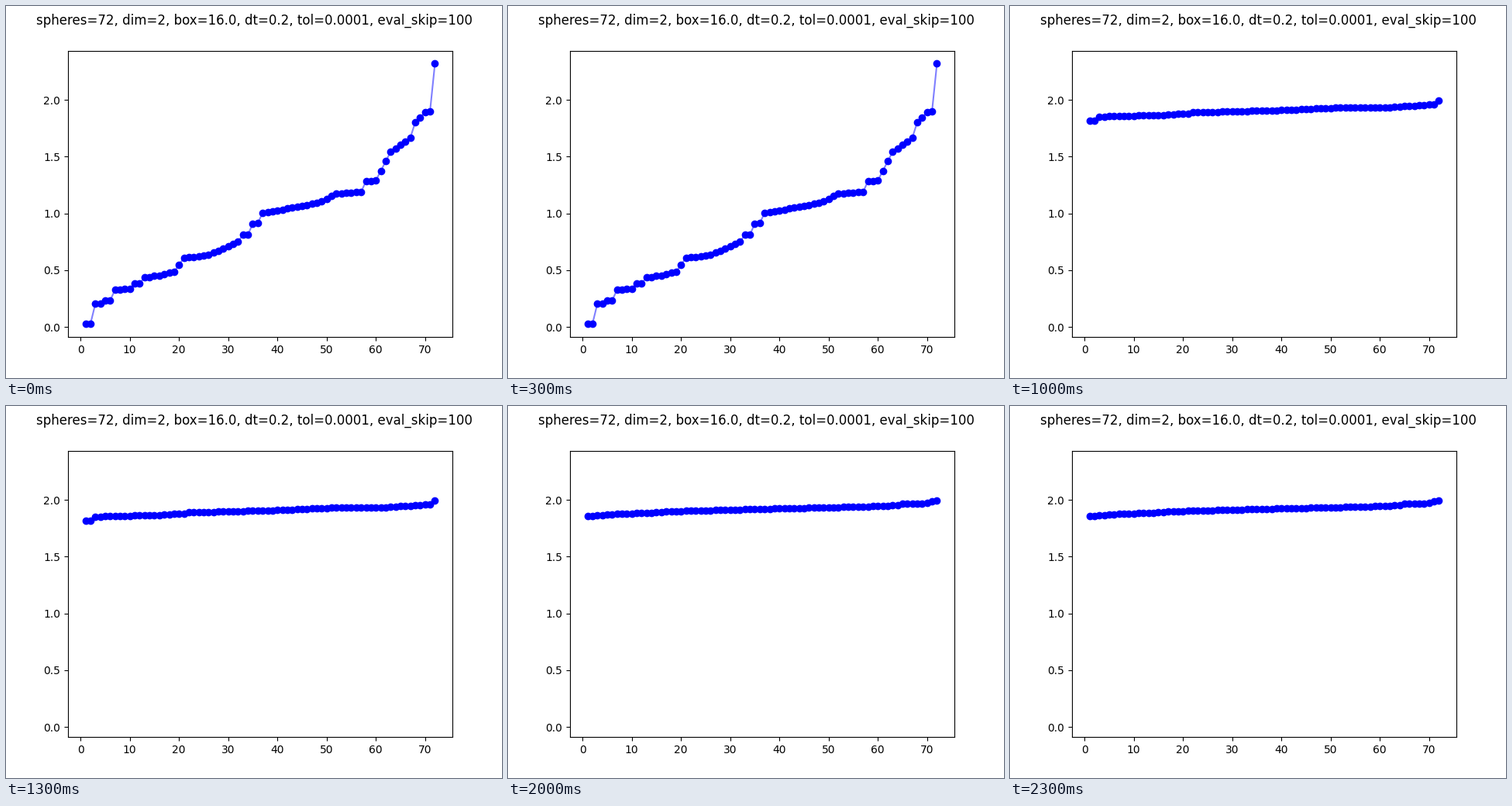
Recreate the animation shown at these times as a matplotlib script. Size 640 by 480 pixels, loop 2500 ms.

```python
import numpy as np
import matplotlib.pyplot as plt
from matplotlib.animation import FuncAnimation

COUNT = 72
PAIRED = 16  # closest spheres are mutual neighbours and share one distance

ranks = np.arange(1, COUNT + 1)


def curve(*knots):
    """Sorted distances through a few (rank, distance) knots."""
    at = np.where(ranks <= PAIRED, ranks - (ranks + 1) % 2, ranks)
    return np.interp(at, *zip(*knots))


curves = [
    # random start, with a jump between each group of spheres
    curve((1, 0.026), (3, 0.203), (5, 0.233), (7, 0.327), (9, 0.334),
          (13, 0.436), (19, 0.485), (21, 0.609), (26, 0.634), (32, 0.752),
          (33, 0.813), (34, 0.813), (35, 0.910), (36, 0.916), (37, 1.004),
          (45, 1.066), (49, 1.107), (52, 1.175), (57, 1.190), (58, 1.285),
          (60, 1.291), (63, 1.543), (67, 1.667), (68, 1.803), (70, 1.892),
          (71, 1.899), (72, 2.3195)),
    # spread out, then slowly evening out
    curve((1, 1.797), (13, 1.843), (21, 1.852), (22, 1.864), (28, 1.867),
          (41, 1.897), (61, 1.917), (70, 1.940), (71, 1.960), (72, 1.967)),
    curve((1, 1.817), (3, 1.853), (15, 1.867), (21, 1.880), (22, 1.890),
          (39, 1.908), (51, 1.931), (62, 1.936), (71, 1.960), (72, 1.9945)),
    curve((1, 1.8444), (3, 1.857), (12, 1.883), (18, 1.888), (33, 1.914),
          (35, 1.925), (48, 1.928), (62, 1.946), (71, 1.974), (72, 1.9945)),
    curve((1, 1.858), (7, 1.878), (14, 1.888), (16, 1.897), (31, 1.915),
          (58, 1.942), (64, 1.954), (65, 1.965), (69, 1.968), (72, 1.9945)),
]

fig, ax = plt.subplots(figsize=(6.4, 4.8), dpi=100)
fig.suptitle("spheres=72, dim=2, box=16.0, dt=0.2, tol=0.0001, eval_skip=100")
line, = ax.plot(ranks, curves[0], "b-", alpha=0.5)
dots, = ax.plot(ranks, curves[0], "bo")

# Keep the limits of the first, widest curve.
ax.set_xlim(ax.get_xlim())
ax.set_ylim(ax.get_ylim())


def update(i):
    for artist in (line, dots):
        artist.set_ydata(curves[i])
    return line, dots


anim = FuncAnimation(fig, update, frames=len(curves), interval=500,
                     repeat=True, repeat_delay=0)
plt.show()
```
